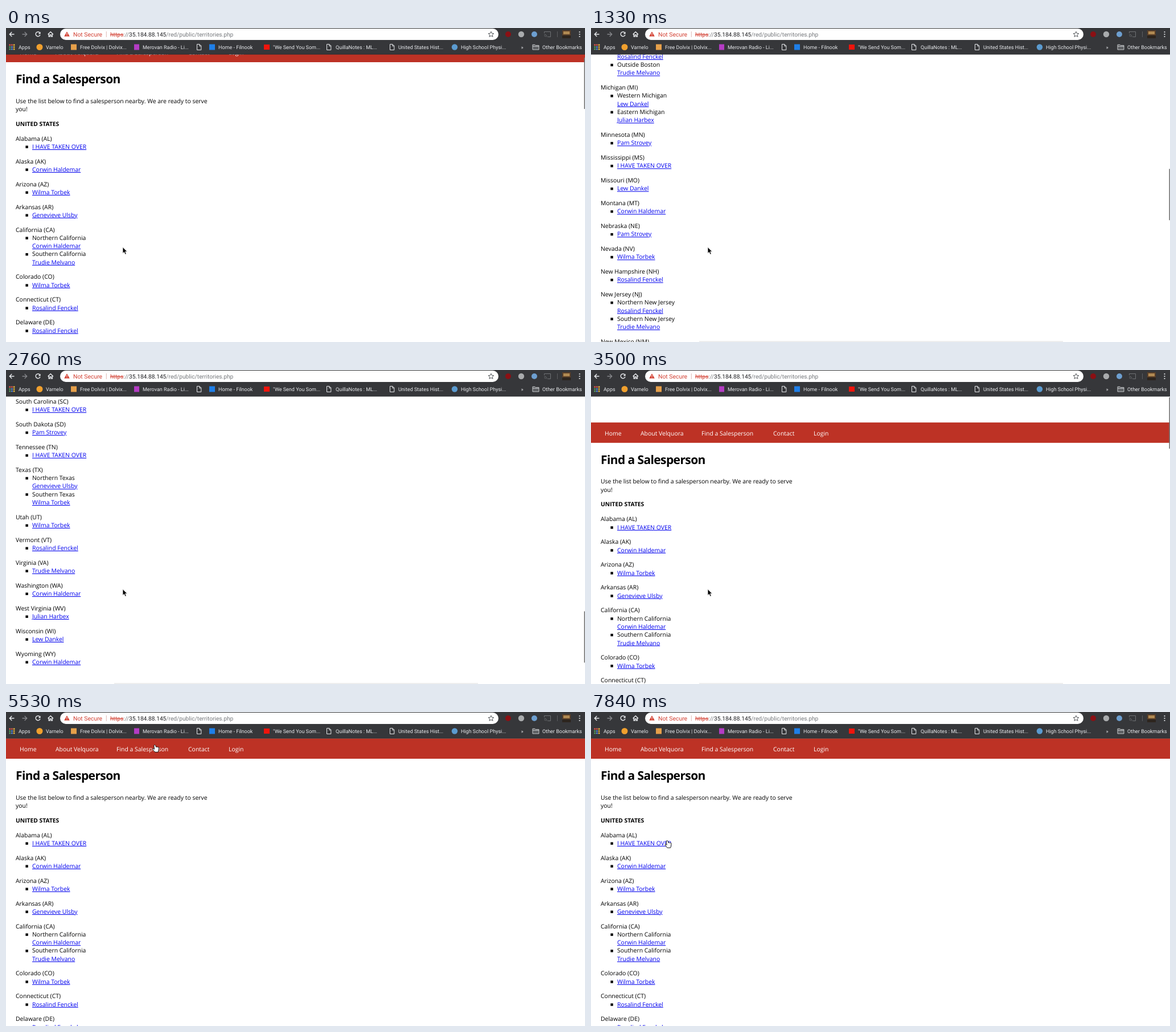
Recreate the animation shown at these times as an HTML page. Size 1017x551 px, loop 7990 ms.

```html
<!DOCTYPE html>
<html lang="en">
<head>
<meta charset="utf-8">
<title>Find a Salesperson</title>
<style>
  html, body { margin: 0; width: 100%; height: 100%; overflow: hidden; background: #fff; }
  svg { display: block; width: 1017px; height: 551px; }
  text { white-space: pre; text-rendering: geometricPrecision; }
  #page { font: 10.45px "Open Sans", "Noto Sans", sans-serif; }
  #page .title { font-size: 21px; font-weight: 700; letter-spacing: -.6px; }
  #page .bold { font-size: 10.3px; font-weight: 700; }
  #page .nav { fill: #fff; }
  #page .link { fill: #00e; text-decoration: underline; }
  #bar { font: 10.2px Roboto, Inter, sans-serif; }
  #marks { font-size: 9px; fill: #e8eaed; }
  .line { fill: none; stroke: #e8eaed; stroke-width: 1.4; }
</style>
</head>
<body>
<svg viewBox="0 0 1017 551">
  <rect width="1017" height="551" fill="#fff"/>
  <g id="page"><rect y="46.3" width="1017" height="35.7" fill="#bd3225"/></g>
  <rect id="edge" x="190" y="549.3" width="639" height="1.7" fill="#ececec"/>
  <rect id="thumb" x="1015.4" width="1.6" height="90" fill="#777"/>

  <g id="bar">
    <rect width="1017" height="46.3" fill="#36373a"/>
    <rect y="45.6" width="1017" height=".8" fill="#2a2b2d"/>
    <path class="line" d="M14.5 11H6.5M10.3 7l-4 4 4 4"/>
    <path class="line" style="stroke:#85868a" d="M28.5 11h8M32.7 7l4 4-4 4"/>
    <path class="line" d="M59.4 8.3A4 4 0 1 0 60 12"/>
    <path d="M60.6 6.4v4h-4z" fill="#e8eaed"/>
    <path class="line" d="M73.6 11.2 78.3 6.8 83 11.2M75.2 10.3v4.7h2v-3h2.2v3h2v-4.7"/>

    <rect x="95" y="1" width="770" height="20" rx="10" fill="#fff"/>
    <path d="M107 6.2l4.8 8.6h-9.6z" fill="#d23f31"/>
    <path d="M107 9v3M107 12.8v1" stroke="#fff" stroke-width="1"/>
    <text x="118" y="14.5" font-size="10.4" fill="#d23f31">Not Secure</text>
    <path d="M176.3 6v10" stroke="#d5a5a1" stroke-width=".8"/>
    <text x="183" y="14.5" fill="#75787c"><tspan fill="#d23f31" text-decoration="line-through">https</tspan>://<tspan fill="#202124">35.184.88.145</tspan>/red/public/territories.php</text>
    <path d="M852 6.2l1.4 3.2 3.5.3-2.7 2.3.9 3.4-3.1-1.8-3.1 1.8.9-3.4-2.7-2.3 3.5-.3z" fill="none" stroke="#55585c"/>

    <circle cx="882" cy="11" r="5" fill="#8b1014"/>
    <circle cx="905" cy="11" r="5.2" fill="#a9abad"/>
    <circle cx="928" cy="11" r="5" fill="#6d9fd0"/>
    <path class="line" style="stroke:#6f7174;stroke-width:1" d="M945.5 9V6.5h11v9h-5M945.5 11a4.5 4.5 0 0 1 4.5 4.5M945.5 13.4a2 2 0 0 1 2 2"/>
    <path d="M968.5 6v10" stroke="#65676a" stroke-width=".8"/>
    <g>
      <rect x="977" y="4" width="15" height="14" fill="#5b4029"/>
      <rect x="979" y="6" width="11" height="5" fill="#b18a53"/>
      <rect x="977" y="13" width="15" height="5" fill="#2d251e"/>
    </g>
    <g fill="#e8eaed">
      <circle cx="1007.5" cy="7" r="1.1"/><circle cx="1007.5" cy="11" r="1.1"/><circle cx="1007.5" cy="15" r="1.1"/>
    </g>

    <g id="marks">
      <circle cx="59" cy="33.5" r="5.5" fill="#f0a02e"/>
      <rect x="114" y="28.5" width="10" height="10" fill="#e6a04a"/>
      <rect x="225" y="28.5" width="9" height="10" fill="#b43cc4"/>
      <rect x="357" y="28.5" width="10" height="10" fill="#1f7fe8"/>
      <rect x="453" y="29" width="10" height="9" fill="#f0140c"/>
      <circle cx="788" cy="33.5" r="5.2" fill="#5b9bd0"/>
      <path d="M925 29.3h4l1.2 1.3h5.8v7.4h-11zM925 32.3h11" fill="#5b5d60" stroke="#d5d7da" stroke-width=".9"/>
    </g>
  </g>

  <g id="cursor">
    <path id="arrow" d="M0 0v11l2.5-2.3 1.8 4.1 2-.9-1.8-4h3.4z" fill="#000" stroke="#fff" stroke-width=".8"/>
    <path id="beam" d="M-2.5-5.2q2.5 0 2.5 1.4 0-1.4 2.5-1.4M0-4V4.3M-2.5 5.7q2.5 0 2.5-1.4 0 1.4 2.5 1.4M-1.3 2h2.6" fill="none" stroke="#222" stroke-width="1"/>
    <path id="hand" d="M-1.5 0q1.4-1 2 .5L1.6 3.6q.8-.9 1.7 0 1-.8 1.8.2 1.3-.4 1.4 1.1l-.4 4.2-1 3.2H-.4L-4.4 7.4q-.2-1.6 1.8-.9l1.2.9L-2.2 1z" fill="#fff" stroke="#000" stroke-width=".9"/>
  </g>
</svg>

<script>
const $ = id => document.getElementById(id);
const ROW = 100 / 7, GAP = 80 / 7, LOOP = 7990;

function add(parent, tag, attrs, text = "") {
  const node = document.createElementNS("http://www.w3.org/2000/svg", tag);
  for (const key in attrs) node.setAttribute(key, attrs[key]);
  node.textContent = text;
  return parent.appendChild(node);
}
const write = (x, y, text, cls = "") => add($("page"), "text", { x, y, class: cls }, text);

const people = {
  t: "I HAVE TAKEN OVER", r: "Corwin Haldemar", i: "Wilma Torbek", e: "Genevieve Ulsby",
  s: "Trudie Melvano", b: "Rosalind Fenckel", k: "Lew Dankel", h: "Julian Harbex", p: "Pam Strovey"
};

// State (code)=person, or State (code)=region:people/region:people
const states = `Alabama (AL)=t|Alaska (AK)=r|Arizona (AZ)=i|Arkansas (AR)=e
California (CA)=Northern California:r/Southern California:s
Colorado (CO)=i|Connecticut (CT)=b|Delaware (DE)=b|Florida (FL)=t|Georgia (GA)=t
Hawaii (HI)=i|Idaho (ID)=i|Illinois (IL)=Chicago Metro:s/Outside Chicago:k
Indiana (IN)=h|Iowa (IA)=k|Kansas (KS)=p|Kentucky (KY)=h|Louisiana (LA)=e|Maine (ME)=b
Maryland (MD)=s|Massachusetts (MA)=Boston Metro:b/Outside Boston:s
Michigan (MI)=Western Michigan:k/Eastern Michigan:h
Minnesota (MN)=p|Mississippi (MS)=t|Missouri (MO)=k|Montana (MT)=r|Nebraska (NE)=p
Nevada (NV)=i|New Hampshire (NH)=b|New Jersey (NJ)=Northern New Jersey:b/Southern New Jersey:s
New Mexico (NM)=i|New York (NY)=New York City:bs/Outside New York City:b
North Carolina (NC)=t|North Dakota (ND)=p|Ohio (OH)=h|Oklahoma (OK)=e|Oregon (OR)=r
Pennsylvania (PA)=Western Pennsylvania:h/Eastern Pennsylvania:s
Rhode Island (RI)=b|South Carolina (SC)=t|South Dakota (SD)=p|Tennessee (TN)=t
Texas (TX)=Northern Texas:e/Southern Texas:i|Utah (UT)=i|Vermont (VT)=b|Virginia (VA)=s
Washington (WA)=r|West Virginia (WV)=h|Wisconsin (WI)=k|Wyoming (WY)=r`.split(/[|\n]/);

function buildPage() {
  const nav = { Home: 24, "About Velquora": 87, "Find a Salesperson": 194, Contact: 320, Login: 391 };
  for (const label in nav) write(nav[label], 69.4, label, "nav");
  write(17, 119.3, "Find a Salesperson", "title");
  write(17, 153.7, "Use the list below to find a salesperson nearby. We are ready to serve");
  write(17, 168, "you!");
  write(17, 193.7, "UNITED STATES", "bold");

  let y = 219.6;
  for (const entry of states) {
    const [name, list] = entry.split("=");
    write(17, y, name);
    y += ROW;
    for (const item of list.split("/")) {
      const [who, region] = item.split(":").reverse();
      add($("page"), "rect", { x: 34.4, y: y - 5.4, width: 4.4, height: 4.4 });
      if (region) {
        write(46, y, region);
        y += ROW;
      }
      for (const key of who) {
        write(46, y, people[key], "link");
        y += ROW;
      }
    }
    y += GAP;
  }
}

function buildBookmarks() {
  const marks = $("marks");
  const labels = {
    "Apps": 22, "Varnelo": 70, "Free Dolvix | Dolvix...": 130, "Merovan Radio - Li...": 240,
    "Home - Filnook": 373, "\"We Send You Som...": 469, "QuillaNotes : ML...": 579,
    "United States Hist...": 689, "High School Physi...": 799, "»": 904.5, "Other Bookmarks": 942
  };
  for (const label in labels) add(marks, "text", { x: labels[label], y: 36.8 }, label);
  const colors = ["#e8574a", "#e8574a", "#f0bd3c", "#58a65c", "#5a8dee", "#f0bd3c", "#58a65c", "#5a8dee", "#f0bd3c"];
  colors.forEach((fill, n) => add(marks, "rect", {
    x: 5.5 + n % 3 * 3.7, y: 28.5 + Math.floor(n / 3) * 3.7, width: 2.5, height: 2.5, fill
  }));
  for (const x of [335.5, 563.5, 674.5])
    add(marks, "path", { d: `M${x} 28.5h4.5l2.8 2.8v7.2h-7.3zM${x + 4.3} 28.7v2.9h2.9`, class: "line", style: "stroke-width:1" });
}

// [time, value...]: each value holds until the next time
const scrolls = [
  [0, 22], [150, 60], [390, 190], [630, 363.6], [870, 600], [1100, 830], [1330, 1080], [1570, 1330],
  [1810, 1565.2], [2050, 1800], [2280, 1930], [2520, 2000], [2710, 2035], [2900, 2050],
  [3260, 900], [3500, -45.8], [3740, -18], [3980, -5], [4210, 0]
];
const moves = [
  [0, 205, 384.5, "arrow"], [3980, 212, 220, "arrow"], [4210, 218, 87.5, "arrow"], [4420, 219, 80, "arrow"],
  [4630, 223.5, 72.5, "arrow"], [5080, 230, 71, "arrow"], [5230, 238, 70.5, "arrow"], [5530, 262, 58, "hand"],
  [5680, 290, 44, "arrow"], [5830, 325, 30, "arrow"], [5980, 360, 19, "beam"], [6120, 392, 17, "beam"],
  [6270, 411, 17, "beam"], [6450, 440, 16, "beam"], [6660, 600, 15, "beam"], [6810, 780, 14, "beam"],
  [6960, 560, 60, "arrow"], [7110, 330, 140, "arrow"], [7260, 190, 205, "arrow"], [7400, 119, 237, "arrow"],
  [7840, 134.5, 226, "hand"]
];
const at = (steps, t) => steps.findLast(step => step[0] <= t);
const show = (id, on) => $(id).setAttribute("visibility", on ? "visible" : "hidden");

function draw(t) {
  const scroll = at(scrolls, t)[1];
  $("page").setAttribute("transform", `translate(0 ${-scroll})`);
  $("thumb").setAttribute("y", 48 + Math.max(0, scroll) * .1845);
  show("thumb", t < 3980);
  show("edge", t >= 150 && t < 5530);

  const [, x, y, shape] = at(moves, t);
  $("cursor").setAttribute("transform", `translate(${x} ${y})`);
  for (const id of ["arrow", "beam", "hand"]) show(id, id === shape);
}

function tick() {
  draw(performance.now() % LOOP);
  requestAnimationFrame(tick);
}

buildPage();
buildBookmarks();
tick();
</script>
</body>
</html>
```
